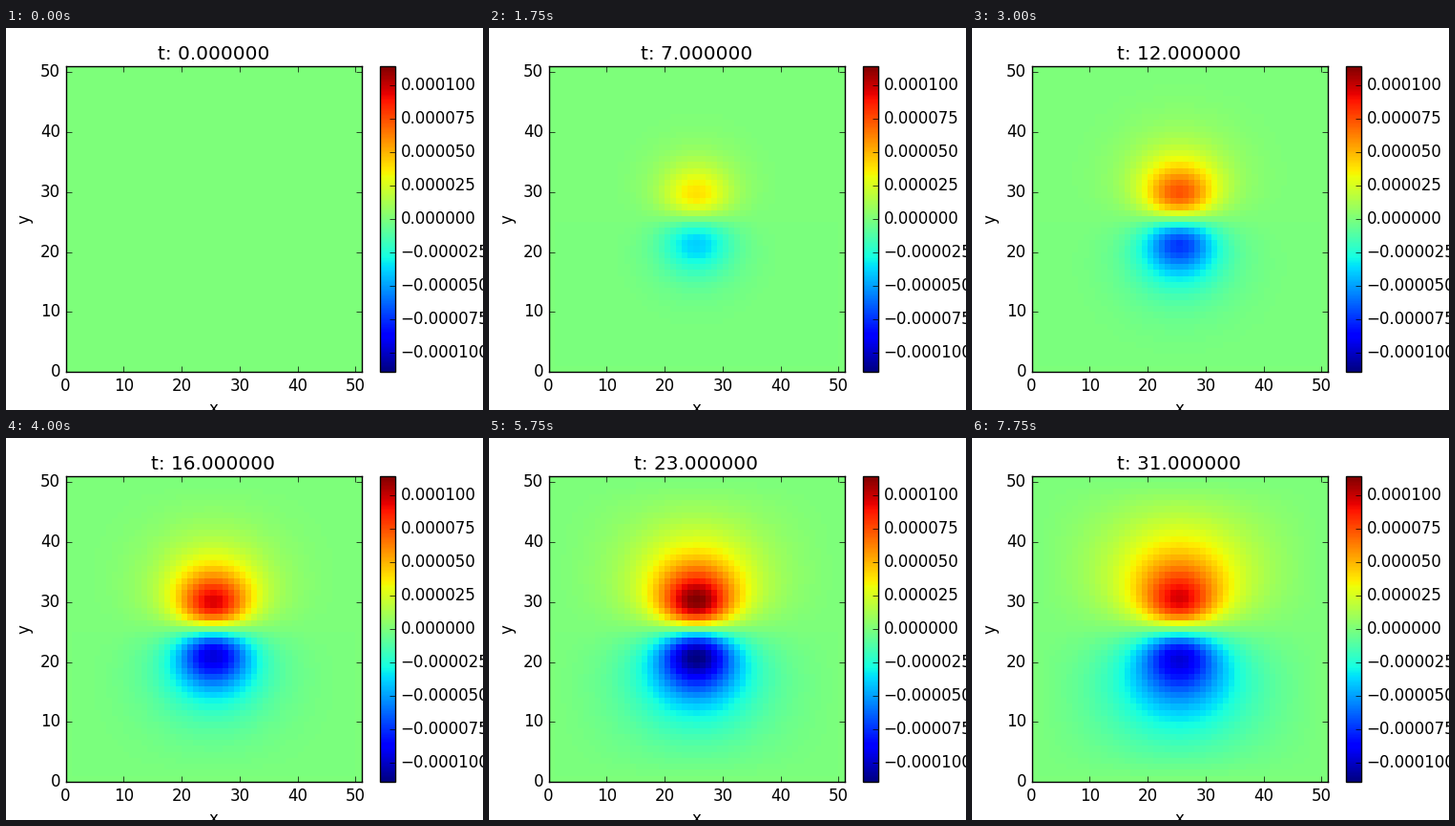
Write a matplotlib script that moves like this. It is 500 px wide and 400 px high and loops after 8000 ms.

```python
import numpy as np
import matplotlib.pyplot as plt
from matplotlib.animation import FuncAnimation

plt.style.use("classic")
plt.rcParams.update({"figure.facecolor": "white", "savefig.facecolor": "white",
                     "font.family": "DejaVu Sans"})

FRAMES, INTERVAL = 32, 250
N = 51              # cells per side
PEAK = 1.143e-4     # colour limit
DIFFUSION = 4.0     # cells^2 per frame
PERIOD = 80         # frames per forcing cycle
SIGMA = 3.3         # dipole width in cells
SUBSTEPS = 25


def simulate():
    """Diffuse an oscillating dipole inside a box held at zero."""
    y, x = np.mgrid[:N, :N] - N // 2
    dipole = y * np.exp(-(x**2 + y**2) / (2 * SIGMA**2))
    u = np.zeros((N, N))
    dt = 1 / SUBSTEPS
    states = [u.copy()]
    for step in range((FRAMES - 1) * SUBSTEPS):
        drive = np.sin(2 * np.pi * step * dt / PERIOD)
        lap = (u[2:, 1:-1] + u[:-2, 1:-1] + u[1:-1, 2:] + u[1:-1, :-2]
               - 4 * u[1:-1, 1:-1])
        u[1:-1, 1:-1] += dt * (DIFFUSION * lap + drive * dipole[1:-1, 1:-1])
        if (step + 1) % SUBSTEPS == 0:
            states.append(u.copy())
    states = np.array(states)
    return states * PEAK / np.abs(states).max()


states = simulate()

fig = plt.figure(figsize=(5, 4), dpi=100)
ax = fig.add_axes([0.125, 0.1, 0.62, 0.8])
mesh = ax.pcolormesh(states[0], cmap="jet", vmin=-PEAK, vmax=PEAK)
ax.set(xlim=(0, N), ylim=(0, N), xlabel="x", ylabel="y",
       xticks=range(0, N, 10), yticks=range(0, N, 10))
title = ax.set_title("")

cax = fig.add_axes([0.78375, 0.1, 0.032, 0.8])
ticks = np.arange(-4, 5) * 2.5e-5
bar = fig.colorbar(mesh, cax=cax)
bar.set_ticks(ticks, labels=[f"{v:.6f}".replace("-", "\u2212") for v in ticks])


def draw(i):
    mesh.set_array(states[i])
    title.set_text(f"t: {i:.6f}")
    return mesh, title


anim = FuncAnimation(fig, draw, frames=FRAMES, interval=INTERVAL,
                     repeat=True, repeat_delay=0, blit=False)
plt.show()
```
